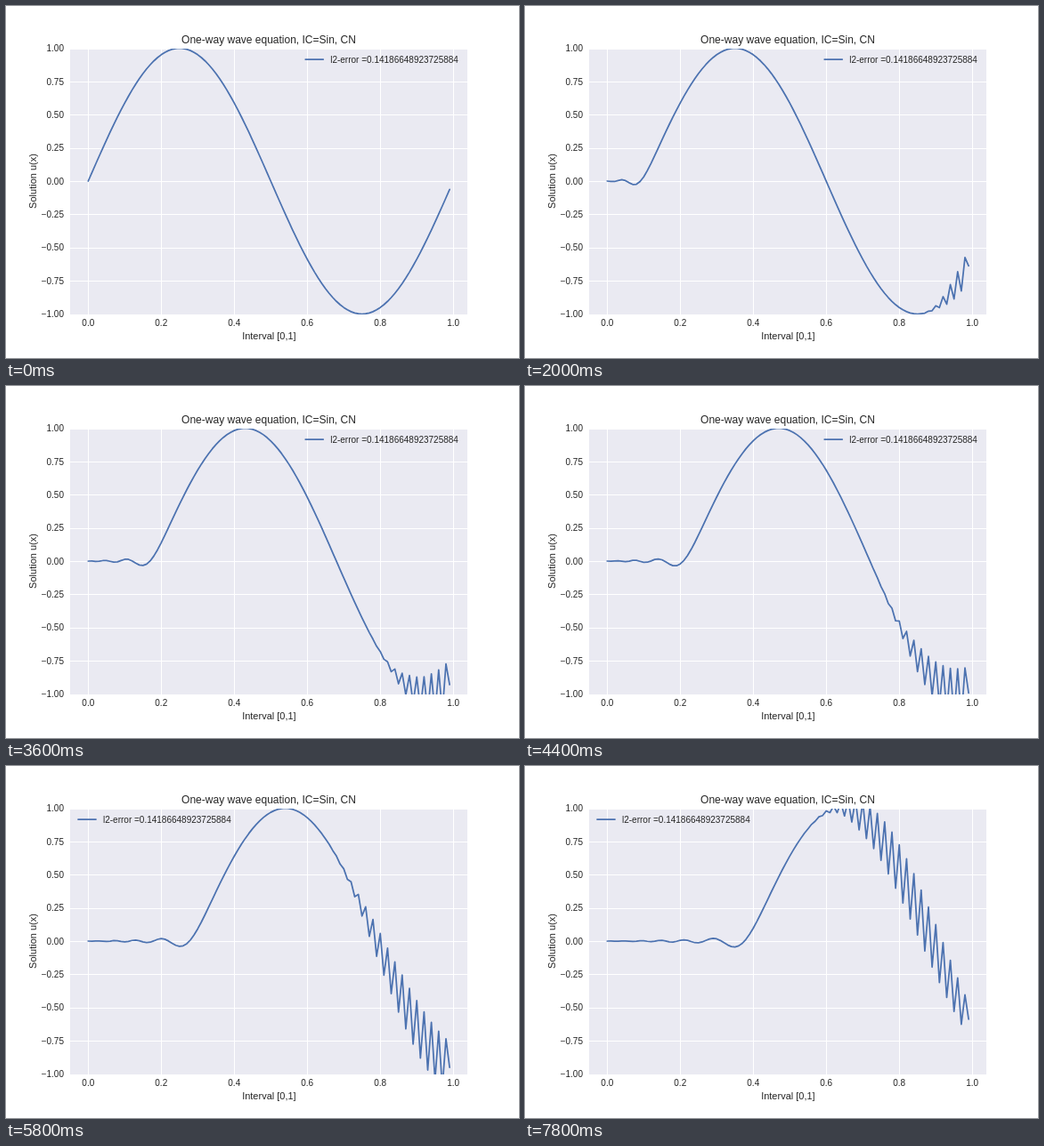
Recreate the animation shown at these times as an HTML page. Size 576 px wide and 396 px high, loop 8 s.

```html
<!DOCTYPE html>
<html lang="en">
<head>
<meta charset="utf-8">
<title>One-way wave equation</title>
<style>
  html, body { margin: 0; width: 100%; height: 100%; overflow: hidden; background: #fff; }
  svg { display: block; font-family: "Liberation Sans", Arial, sans-serif; fill: #262626; }
  .curve { fill: none; stroke: #4c72b0; stroke-width: 1.75; stroke-linecap: round; stroke-linejoin: round; }
  .grid { stroke: #fff; stroke-width: 1; }
</style>
</head>
<body>
<svg width="576" height="396" viewBox="0 0 576 396">
  <clipPath id="axes"><rect x="72" y="48" width="446" height="299"/></clipPath>
  <rect x="72" y="48" width="446" height="299" fill="#eaeaf2"/>
  <g id="grid" class="grid" clip-path="url(#axes)"></g>
  <g id="ticks" font-size="10"></g>
  <text x="295" y="42" font-size="12" text-anchor="middle">One-way wave equation, IC=Sin, CN</text>
  <text x="295.4" y="375" font-size="11" text-anchor="middle">Interval [0,1]</text>
  <text transform="translate(33.5 197) rotate(-90)" font-size="11" text-anchor="middle">Solution u(x)</text>
  <g clip-path="url(#axes)"><polyline id="wave" class="curve"/></g>
  <g id="legend">
    <path class="curve" d="M0 60H20"/>
    <text x="28" y="64.3" font-size="10">l2-error =0.14186648923725884</text>
  </g>
</svg>
<script>
const POINTS = 100, DX = 0.01, FRAMES = 40, FRAME_MS = 200, LEGEND_MOVE = 25;
const $ = id => document.getElementById(id);
const px = x => 92.3 + 409.9 * x;
const py = u => 197 - 149.5 * u;
const snap = v => Math.round(v) + 0.5;
const exact = x => Math.sin(2 * Math.PI * x);

function add(parent, name, attrs, text = "") {
  const el = document.createElementNS("http://www.w3.org/2000/svg", name);
  for (const key in attrs) el.setAttribute(key, attrs[key]);
  el.textContent = text;
  parent.append(el);
}

for (let i = 0; i <= 5; i++) {
  const x = px(i / 5), line = snap(x);
  add($("grid"), "line", { x1: line, x2: line, y1: 48, y2: 347 });
  add($("ticks"), "text", { x, y: 360.3, "text-anchor": "middle" }, (i / 5).toFixed(1));
}
for (let i = -4; i <= 4; i++) {
  const y = py(i / 4), line = snap(y);
  add($("grid"), "line", { x1: 72, x2: 518, y1: line, y2: line });
  add($("ticks"), "text", { x: 65, y: y + 3.7, "text-anchor": "end" },
    (i / 4).toFixed(2).replace("-", "−"));
}

// Crank–Nicolson step at Courant number 1; values outside the grid count as 0.
function step(u, time) {
  const k = 0.25, c = [], d = [], next = [];
  for (let j = 0; j < POINTS; j++) {
    const rhs = u[j] - k * ((u[j + 1] ?? 0) - (u[j - 1] ?? 0));
    const pivot = 1 + k * (c[j - 1] ?? 0);
    c[j] = k / pivot;
    d[j] = (rhs + k * (d[j - 1] ?? 0)) / pivot;
  }
  for (let j = POINTS - 1; j >= 0; j--) next[j] = d[j] - c[j] * (next[j + 1] ?? 0);
  next[0] = 0;
  next[POINTS - 1] = exact((POINTS - 1) * DX - time);
  return next;
}

const states = [Array.from({ length: POINTS }, (_, j) => exact(j * DX))];
for (let n = 1; n < FRAMES; n++) states.push(step(states[n - 1], n * DX));
const curves = states.map(u =>
  u.map((v, j) => px(j * DX).toFixed(2) + "," + py(v).toFixed(2)).join(" "));

let shown = -1;
function draw(now) {
  const n = Math.floor(now / FRAME_MS) % FRAMES;
  if (n !== shown) {
    shown = n;
    $("wave").setAttribute("points", curves[n]);
    $("legend").setAttribute("transform", `translate(${n < LEGEND_MOVE ? 336.2 : 81})`);
  }
  requestAnimationFrame(() => draw(performance.now()));
}
draw(performance.now());
</script>
</body>
</html>
```
